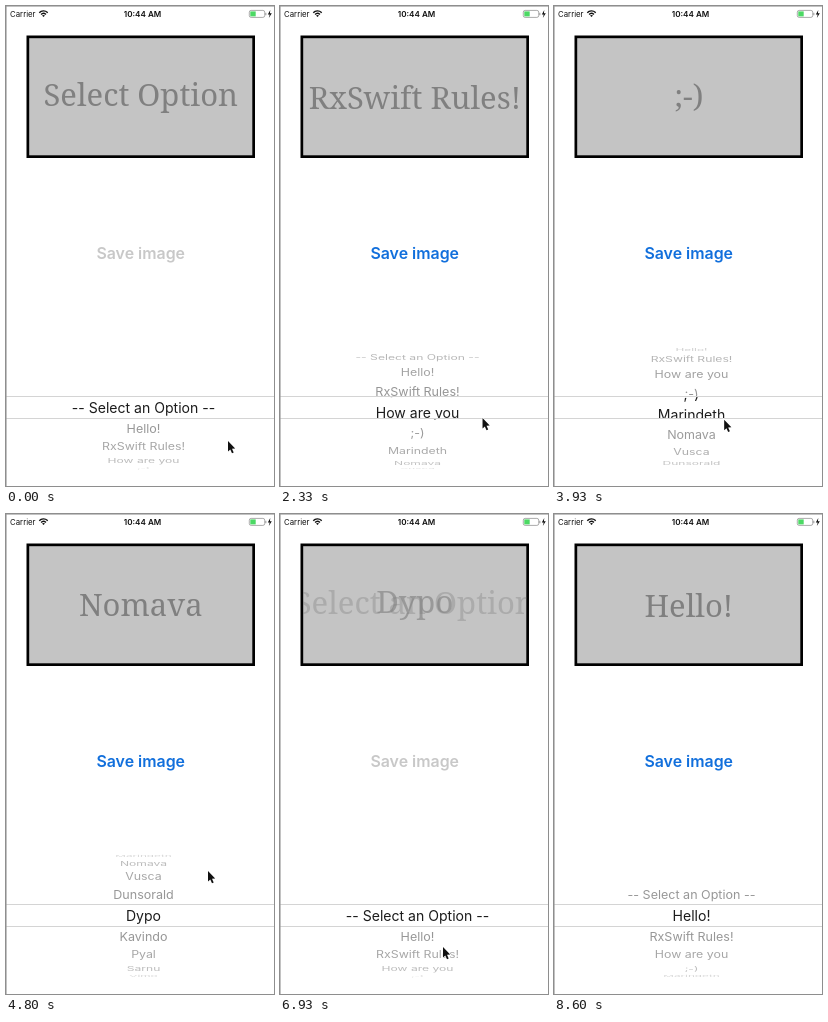
An HTML page with a canvas that plays this animation: 268x480 px, repeating every 9540 ms.

```html
<!DOCTYPE html>
<html lang="en">
<head>
<meta charset="utf-8">
<title>Picker demo</title>
<style>
html, body { margin: 0; width: 100%; height: 100%; overflow: hidden; background: #fff; }
canvas { display: block; width: 268px; height: 480px; }
</style>
</head>
<body>
<canvas></canvas>
<script>
const canvas = document.querySelector('canvas');
const ctx = canvas.getContext('2d');
const ratio = window.devicePixelRatio || 1;
canvas.width = 268 * ratio;
canvas.height = 480 * ratio;

const LOOP = 9540, FADE = 300, POINTER_GONE = 8600;
const SANS = 'Inter, Roboto, sans-serif';
const SLAB = '"Noto Serif", serif';
const items = ['-- Select an Option --', 'Hello!', 'RxSwift Rules!', 'How are you', ';-)',
  'Marindeth', 'Nomava', 'Vusca', 'Dunsorald', 'Dypo', 'Kavindo', 'Pyal', 'Sarnu', 'Vimo'];

// Each move turns the wheel to a row while the pointer travels to x, y.
const initial = { row: 0, x: 222, y: 435 };
const moves = [
  { start: 70, end: 560, row: 1, x: 218, y: 406 },
  { start: 1430, end: 1640, row: 2, x: 212, y: 412 },
  { start: 2000, end: 2470, row: 3, x: 200, y: 412 },
  { start: 2670, end: 2950, row: 4, x: 165, y: 423 },
  { start: 3670, end: 4780, row: 9, x: 202, y: 357 },
  { start: 5130, end: 6450, row: 0, x: 163, y: 433 },
  { start: 7200, end: 7600, row: 1, x: 176, y: 404 },
];

// The caption follows late and skips rows that pass quickly.
const captions = [
  { start: 700, row: 1 }, { start: 1500, row: 2 }, { start: 2850, row: 4 }, { start: 4250, row: 6 },
  { start: 5250, row: 9 }, { start: 6820, row: 0 }, { start: 7700, row: 1 },
];

const clamp = v => Math.min(1, Math.max(0, v));
const smooth = v => v * v * (3 - 2 * v);
const mix = (a, b, p) => a + (b - a) * p;

function stateAt(time) {
  let state = initial;
  for (const move of moves) {
    if (time < move.start) break;
    const u = clamp((time - move.start) / (move.end - move.start)), p = smooth(u);
    // Turning the wheel back drags the pointer downwards.
    const dip = Math.max(0, state.row - move.row) * 14 * Math.sin(Math.PI * u);
    state = {
      row: mix(state.row, move.row, p),
      x: mix(state.x, move.x, p),
      y: mix(state.y, move.y, p) + dip,
    };
  }
  return state;
}

function text(string, x, y, font, color, align = 'center') {
  ctx.font = font;
  ctx.fillStyle = color;
  ctx.textAlign = align;
  ctx.fillText(string, x, y);
}

function rect(x, y, w, h, color) {
  ctx.fillStyle = color;
  ctx.fillRect(x, y, w, h);
}

function clipped(x, y, w, h, paint) {
  ctx.save();
  ctx.beginPath();
  ctx.rect(x, y, w, h);
  ctx.clip();
  paint();
  ctx.restore();
}

function shape(path, x, y, outlined) {
  const p = new Path2D(path);
  ctx.save();
  ctx.translate(x, y);
  if (outlined) {
    ctx.strokeStyle = '#fff';
    ctx.lineWidth = 1.4;
    ctx.stroke(p);
  }
  ctx.fillStyle = '#111';
  ctx.fill(p);
  ctx.restore();
}

function drawStatusBar() {
  text('Carrier', 4, 10.7, '7.8px ' + SANS, '#111', 'left');
  text('10:44 AM', 136.5, 10.8, '600 8.1px ' + SANS, '#111');

  ctx.strokeStyle = '#111';
  ctx.lineWidth = 1.4;
  for (const r of [3.3, 5.8]) {
    ctx.beginPath();
    ctx.arc(37.5, 10.7, r, -Math.PI * .76, -Math.PI * .24);
    ctx.stroke();
  }
  shape('M0 2 L-1.5 .5 L0 0 L1.5 .5 Z', 37.5, 9);

  ctx.strokeStyle = '#888';
  ctx.lineWidth = .7;
  ctx.beginPath();
  ctx.roundRect(243.3, 4.4, 15.4, 7, 1.8);
  ctx.stroke();
  rect(244.3, 5.4, 5.4, 5, '#4cd964');
  rect(259.4, 6.8, .9, 2.4, '#888');
  shape('M0 -4 L-2.5 .5 H-.6 L-1.5 4 L1.5 -.7 H-.4 Z', 264.3, 8);
}

// Captions are centred on their ink, not on their line box.
function drawCaption(string, alpha) {
  ctx.font = '31px ' + SLAB;
  ctx.textAlign = 'center';
  const m = ctx.measureText(string);
  const y = 91 + (m.actualBoundingBoxAscent - m.actualBoundingBoxDescent) / 2;
  ctx.globalAlpha = alpha;
  ctx.fillStyle = '#808080';
  ctx.fillText(string, 134.8, y);
  ctx.globalAlpha = 1;
}

function drawCard(time) {
  rect(20.5, 29.5, 228.5, 122.5, '#000');
  rect(23.2, 32.2, 223.1, 117.1, '#c4c4c4');
  clipped(23.2, 32.2, 223.1, 117.1, () => {
    const begun = captions.filter(c => time >= c.start);
    const names = ['Select Option', ...begun.map(c => items[c.row])];
    const p = begun.length ? clamp((time - begun.at(-1).start) / FADE) : 1;
    if (p < 1) drawCaption(names.at(-2), 1 - p);
    drawCaption(names.at(-1), p);
  });
}

function drawWheel(position) {
  const step = Math.PI / 9, radius = 60.7, centerY = 402;
  items.forEach((item, i) => {
    const angle = (i - position) * step;
    if (Math.abs(angle) > 1.5) return;
    const cos = Math.cos(angle);
    ctx.save();
    ctx.translate(137.5, centerY + radius * Math.sin(angle));
    ctx.scale(.92 + .08 * cos, cos);
    text(item, 0, 4.5, '12.6px ' + SANS, `rgba(0,0,0,${.1 + .33 * cos})`);
    ctx.restore();
  });

  // The selected band shows a magnified copy of the list.
  rect(0, 390, 268, 23, '#fff');
  clipped(0, 390, 268, 23, () => items.forEach((item, i) => {
    const y = centerY + (i - position) * 21;
    text(item, 137.5, y + 5.2, '14.05px ' + SANS, '#1c1c1c');
  }));
  for (const y of [390, 412]) rect(0, y, 268, 1, '#d4d4d4');
}

function draw(time) {
  const { row, x, y } = stateAt(time);
  ctx.setTransform(ratio, 0, 0, ratio, 0, 0);
  rect(0, 0, 268, 480, '#fff');
  drawStatusBar();
  drawCard(time);
  text('Save image', 134.7, 252.6, '600 15.9px ' + SANS, row > .5 ? '#116fdc' : '#c8c8c8');
  drawWheel(row);
  rect(0, 0, .6, 480, '#999');
  rect(0, 0, 268, .6, '#999');
  if (time < POINTER_GONE) shape('M0 0 V10.4 L2.3 8.4 L4 12.3 L5.7 11.5 L4 7.8 L7.2 7.6 Z', x, y, true);
}

const begin = performance.now();
function tick() {
  draw((performance.now() - begin) % LOOP);
  requestAnimationFrame(tick);
}
tick();
</script>
</body>
</html>
```
